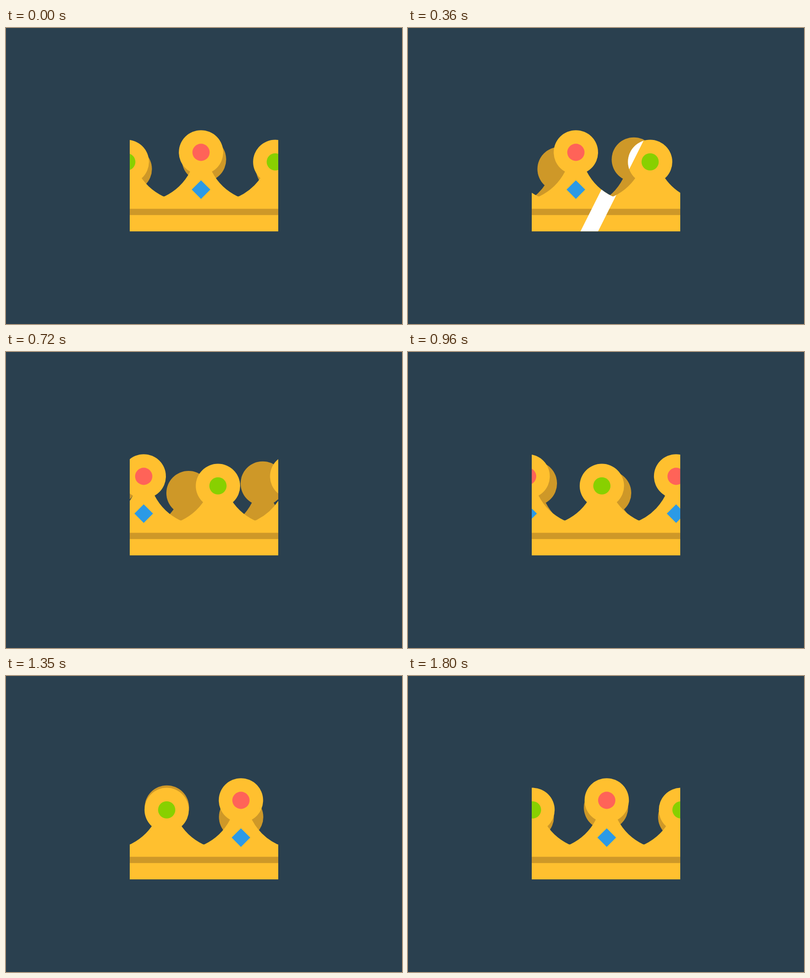
These frames come from a looping animation (800x600 px, 1.83 s). An HTML page:

```html
<!DOCTYPE html>
<html lang="en">
<head>
<meta charset="utf-8">
<title>Turning crown</title>
<style>
  html, body { margin: 0; width: 100%; height: 100%; overflow: hidden; background: #2a404f; }
  svg { display: block; width: 100%; height: 100%; }
  .gold { fill: #ffc02f; }
  .shade { fill: #ce9828; }
  .red { fill: #ff6358; }
  .green { fill: #88d000; }
  .blue { fill: #2b9ae6; }
  .white { fill: #fff; }
</style>
</head>
<body>
<svg viewBox="0 0 800 600">
  <defs>
    <path id="hump" d="M-75 342Q-39.5 325-22 291V270H22V291Q39.5 325 75 342Z"/>
    <!-- One full turn of the rim: a tall point and a short point -->
    <g id="turn">
      <use href="#hump"/>
      <circle cy="252" r="44.8"/>
      <use href="#hump" x="150"/>
      <circle cx="150" cy="271.4" r="44.8"/>
    </g>
    <g id="rim">
      <use href="#turn" x="-300"/>
      <use href="#turn"/>
      <use href="#turn" x="300"/>
    </g>
    <g id="gems">
      <circle class="red" cy="252" r="17.4"/>
      <path class="blue" d="M0 308.8L18.8 327.6 0 346.4-18.8 327.6Z"/>
      <circle class="green" cx="150" cy="271.4" r="17.4"/>
    </g>
    <rect id="body" x="250" y="341.5" width="300" height="71"/>
    <clipPath id="window"><rect x="250" y="200" width="300" height="212.5"/></clipPath>
    <mask id="front" maskUnits="userSpaceOnUse" x="250" y="200" width="300" height="213">
      <g class="white">
        <use href="#rim" class="near"/>
        <use href="#body"/>
      </g>
    </mask>
  </defs>

  <g clip-path="url(#window)">
    <use href="#rim" class="shade far"/>
    <use href="#rim" class="gold near"/>
    <use href="#body" class="gold"/>
    <rect class="shade" x="250" y="366.5" width="300" height="12.7"/>
    <g class="near">
      <use href="#gems" x="-300"/>
      <use href="#gems"/>
      <use href="#gems" x="300"/>
    </g>
    <g mask="url(#front)">
      <path id="shine" class="white" d="M0 412.5H-35.5L69.5 202.5H105Z"/>
    </g>
  </g>
</svg>
<script>
  const LOOP = 1830, TICK = 30;
  const near = document.querySelectorAll('.near');
  const far = document.querySelector('.far');
  const shine = document.getElementById('shine');

  const place = (el, x, y = 0) => el.setAttribute('transform', `translate(${x} ${y})`);

  function draw() {
    const tick = Math.floor(performance.now() % LOOP / TICK);
    // Four steps in every five ticks, so the turn pauses briefly at a fixed rhythm
    const step = Math.floor(tick * 4 / 5);
    near.forEach(el => place(el, 394 - 6.094 * step));
    place(far, 100 + 6.25 * step, 14.5);
    place(shine, 152.5 + 25.7 * step);
    requestAnimationFrame(draw);
  }
  draw();
</script>
</body>
</html>
```
